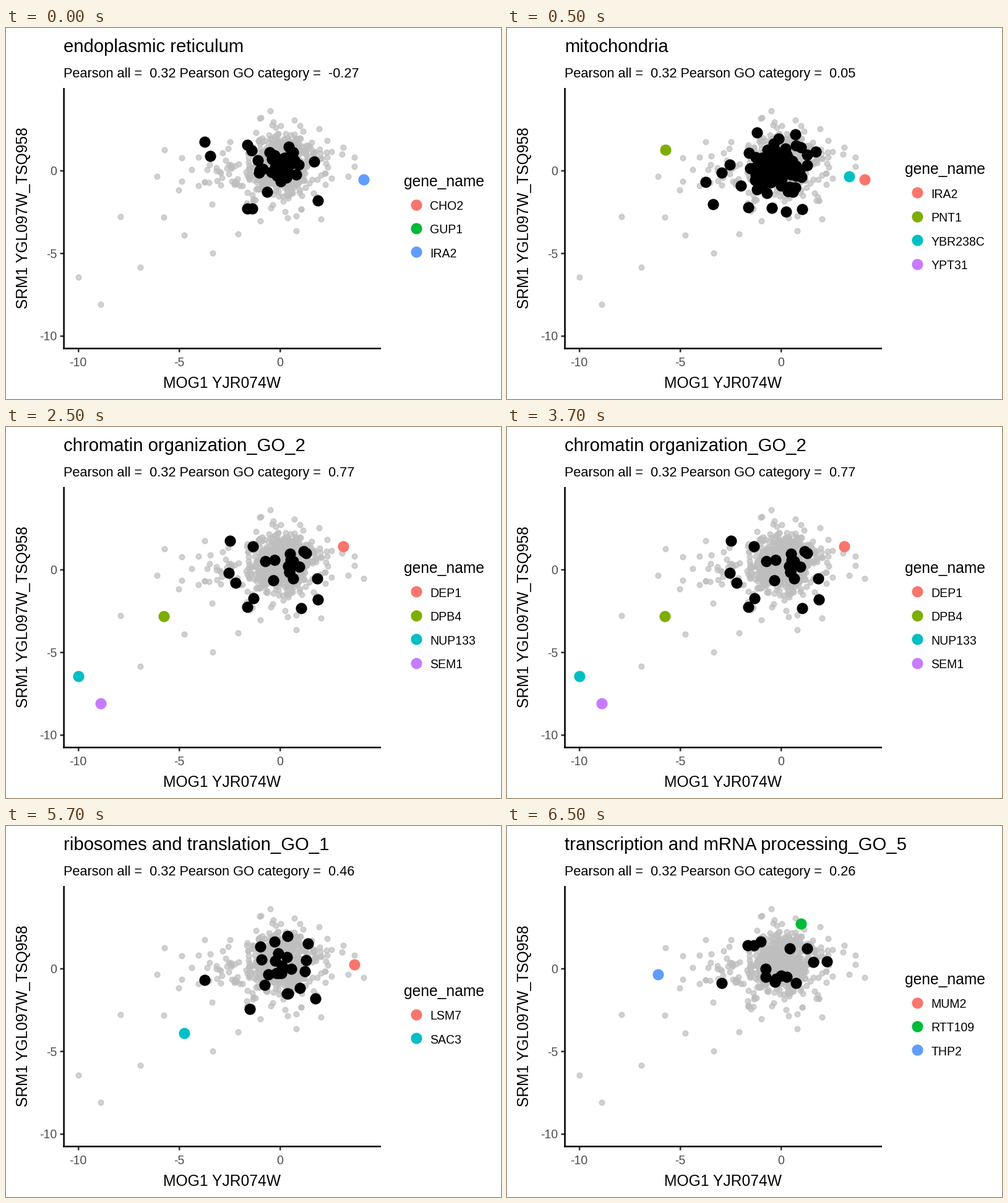
A matplotlib script for the animation above (8 s loop, 800 by 600 pixels).

```python
import matplotlib.pyplot as plt
import numpy as np
from matplotlib.animation import FuncAnimation

W, H, DPI = 800, 600, 160
STEP_MS, STEPS = 500, 16
SMALL_DOT, BIG_DOT = 3.85, 7.45
PALETTES = {
    2: ["#F8766D", "#00BFC4"],
    3: ["#F8766D", "#00BA38", "#619CFF"],
    4: ["#F8766D", "#7CAE00", "#00BFC4", "#C77CFF"],
}
plt.rcParams["font.family"] = "Liberation Sans"
rng = np.random.default_rng(11)


def cloud(count, center, spread, tilt=0.1):
    """Random points around a center, leaning up to the right."""
    z = rng.normal(size=(count, 2))
    z[:, 1] -= tilt * z[:, 0]
    reach = np.hypot(*z.T)
    z *= (np.minimum(reach, 2.3) / reach)[:, None]
    return np.asarray(center) + z * spread


def members(key_points, count, center, spread):
    return np.vstack([key_points, cloud(count, center, spread)])


# Positions are in stage pixels. Each scene: start step, title, category
# correlation, category members, gene -> marked position.
SCENES = [
    (0, "endoplasmic reticulum", "-0.27",
     members([(321, 184), (330, 207), (390, 189), (397, 198), (504, 279),
              (390, 292), (398, 292), (422, 265), (498, 216)],
             34, (443, 225), (19, 17)),
     {"CHO2": None, "GUP1": None, "IRA2": (578, 245)}),
    (1, "mitochondria", "0.05",
     members([(404, 169), (466, 172), (499, 200), (321, 249), (333, 285),
              (347, 234), (360, 221), (378, 255), (390, 290), (428, 291),
              (451, 297), (477, 293)],
             95, (437, 225), (23, 20)),
     {"IRA2": (578, 245), "PNT1": (256, 197), "YBR238C": (553, 240),
      "YPT31": None}),
    (5, "chromatin organization_GO_2", "0.77",
     members([(362, 184), (399, 193), (360, 236), (371, 252), (400, 277),
              (390, 291), (477, 293), (504, 279), (503, 245), (485, 204)],
             14, (453, 225), (18, 17)),
     {"DEP1": (545, 193), "DPB4": (255, 306), "NUP133": (117, 403),
      "SEM1": (153, 447)}),
    (9, "ribosomes and translation_GO_1", "0.46",
     members([(321, 249), (394, 296), (500, 279), (411, 195), (434, 187),
              (455, 178), (488, 190), (475, 262)],
             16, (451, 232), (21, 17)),
     {"LSM7": (563, 224), "SAC3": (288, 335)}),
    (13, "transcription and mRNA processing_GO_5", "0.26",
     members([(347, 254), (389, 193), (399, 193), (410, 187), (457, 198),
              (485, 198), (517, 219), (495, 220), (418, 231)],
             6, (443, 243), (11, 13)),
     {"MUM2": None, "RTT109": (475, 158), "THP2": (244, 240)}),
]

outliers = [(217, 387), (185, 305), (284, 210), (284, 248), (279, 262),
            (300, 229), (334, 364), (375, 333), (411, 312), (469, 328),
            (427, 134), (509, 309), (563, 209)]
marked = [spot for scene in SCENES for spot in scene[4].values() if spot]
background = np.vstack([
    outliers, sorted(set(marked)), *[scene[3] for scene in SCENES],
    cloud(340, (444, 221), (25, 22)),
    cloud(110, (446, 222), (36, 37)),
    cloud(26, (358, 228), (22, 30)),
    cloud(9, (521, 212), (14, 12)),
])

fig = plt.figure(figsize=(W / DPI, H / DPI), dpi=DPI, facecolor="white")
ax = fig.add_axes([0, 0, 1, 1])
ax.set(xlim=(0, W), ylim=(H, 0))
ax.axis("off")


def label(x, y, text, size, color="black", **kw):
    return ax.text(x, y, text, fontsize=size, color=color, va="baseline", **kw)


def dots(points, diameter, color, **kw):
    x, y = np.asarray(points).T
    return ax.scatter(x, y, s=diameter ** 2, c=color, edgecolors=color,
                      linewidths=0.71, **kw)


def line(xs, ys, color, z):
    ax.plot(xs, ys, color=color, lw=1.15, solid_capstyle="butt", zorder=z,
            snap=False)


def draw_axes():
    for value in (-10, -5, 0):
        x, y = 443.2 + 32.6 * value, 231 - 26.74 * value
        line([x, x], [518.3, 524.4], "#333333", 4)
        line([87.5, 93.6], [y, y], "#333333", 4)
        label(x - 0.5, 547, str(value), 8.8, "#4D4D4D", ha="center")
        label(82, y + 7, str(value), 8.8, "#4D4D4D", ha="right")
    line([93.6, 93.6], [97, 519.5], "black", 5)
    line([92.4, 606], [518.3, 518.3], "black", 5)
    label(349, 582, "MOG1 YJR074W", 11.1, ha="center")
    label(35, 307.5, "SRM1 YGL097W_TSQ958", 11.1, ha="center", rotation=90,
          rotation_mode="anchor")


def build_scene(title, corr, group, genes):
    """Create the hidden artists of one category."""
    artists = [
        label(93, 39, title, 13.2),
        label(93, 80, f"Pearson all =  0.32 Pearson GO category =  {corr}", 9.8),
        dots(group, BIG_DOT, "black", zorder=2),
    ]
    top = 324 - 19.2 * (len(genes) - 1)
    artists.append(label(643, top - 30, "gene_name", 11.1))
    for i, (gene, spot) in enumerate(genes.items()):
        color, y = PALETTES[len(genes)][i], top + 38.4 * i
        artists.append(dots([(662.8, y)], BIG_DOT, color))
        artists.append(label(685.5, y + 8.5, gene, 8.8))
        if spot:
            artists.append(dots([spot], BIG_DOT, color, zorder=3))
    for artist in artists:
        artist.set_visible(False)
    return artists


draw_axes()
dots(background, SMALL_DOT, "#BEBEBE", alpha=0.7, zorder=1)
starts = [scene[0] for scene in SCENES]
layers = [build_scene(*scene[1:]) for scene in SCENES]


def update(step):
    current = np.searchsorted(starts, step, side="right") - 1
    for i, layer in enumerate(layers):
        for artist in layer:
            artist.set_visible(i == current)
    return []


anim = FuncAnimation(fig, update, frames=STEPS, interval=STEP_MS, repeat=True)
plt.show()
```
